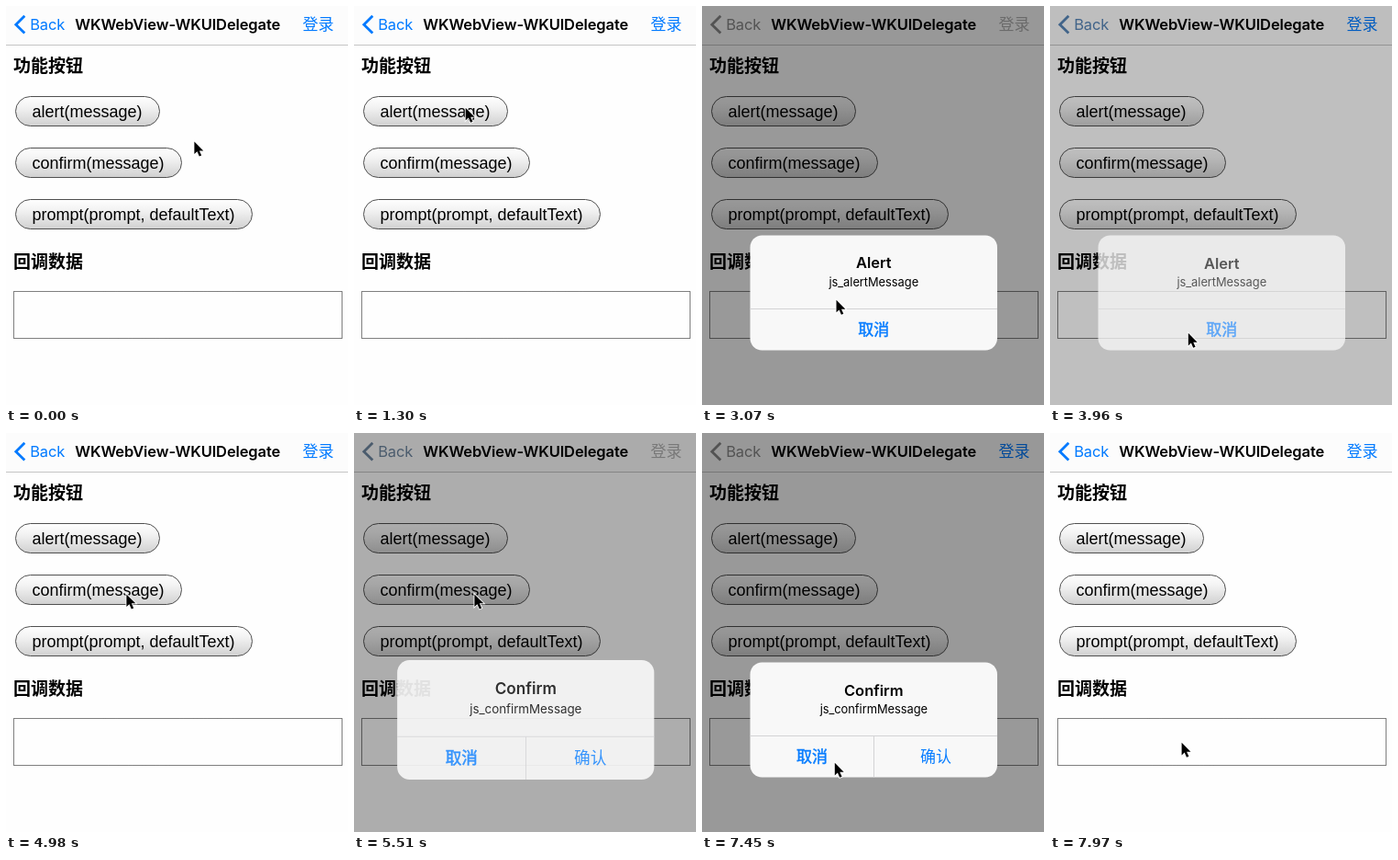
These frames come from a looping animation (373x434 px, 8 s). An HTML page:

```html
<!DOCTYPE html>
<html lang="zh-CN">
<head>
<meta charset="utf-8">
<title>WKWebView-WKUIDelegate</title>
<style>
  html, body { margin: 0; width: 100%; height: 100%; overflow: hidden; background: #fefefe; }
  svg { display: block; width: 100vw; height: 100vh; }
  text { font-family: Inter, "Noto Sans CJK SC", "Noto Sans CJK", sans-serif; white-space: pre; }
  .title { font-size: 16.5px; font-weight: 600; text-anchor: middle; }
  .nav { font-size: 16.5px; letter-spacing: -.15px; }
  .cjk { font-family: "Noto Sans CJK SC", "Noto Sans CJK", sans-serif; font-size: 17px; }
  .head { font-size: 19px; font-weight: 700; }
  .btn rect { fill: url(#gloss); stroke: #505050; }
  .btn text { font: 18px "Liberation Sans", Arial, sans-serif; }
  .msg { font-size: 12.9px; letter-spacing: -.05px; text-anchor: middle; }
  .act { fill: #087dff; text-anchor: middle; }
  .cancel { stroke: #087dff; stroke-width: .5; }
  .rule { stroke: #d3d3d5; stroke-width: 1; }
</style>
</head>
<body>
<svg viewBox="0 0 373 434">
  <defs>
    <linearGradient id="gloss" x2="0" y2="1">
      <stop offset="0" stop-color="#fefefe"/>
      <stop offset=".35" stop-color="#f3f3f3"/>
      <stop offset=".6" stop-color="#e6e6e6"/>
      <stop offset="1" stop-color="#d0d0d0"/>
    </linearGradient>
  </defs>

  <rect width="373" height="434" fill="#fefefe"/>
  <rect width="373" height="42" fill="#fcfcfc"/>
  <path d="M0 42.5H373" stroke="#c4c4c4"/>
  <g id="back">
    <path d="M20.3 10.8L10.8 20.2L20.3 29.6" fill="none" stroke="currentColor" stroke-width="2.8"/>
    <text class="nav" x="26.2" y="26" fill="currentColor">Back</text>
  </g>
  <text class="title" x="187.2" y="26" letter-spacing="-.12">WKWebView-WKUIDelegate</text>
  <text class="cjk" id="login" x="323.6" y="26">登录</text>

  <text class="cjk head" x="8" y="71.5">功能按钮</text>
  <g class="btn"><rect x="10.5" y="98.5" width="157" height="32" rx="16"/><text x="28.5" y="121">alert(message)</text></g>
  <g class="btn"><rect x="10.5" y="154.5" width="181" height="32" rx="16"/><text x="28.5" y="177">confirm(message)</text></g>
  <g class="btn"><rect x="10.5" y="210.5" width="258" height="32" rx="16"/><text x="28.5" y="233">prompt(prompt, defaultText)</text></g>
  <text class="cjk head" x="8" y="285.2">回调数据</text>
  <rect x="8.5" y="310.5" width="358" height="51" fill="none" stroke="#000" stroke-dasharray="1 1"/>

  <rect id="dim" width="373" height="434" opacity="0"/>

  <g id="dialog">
    <rect id="panel" x="52.5" y="249.5" width="269.5" height="125" rx="13" fill="#f8f8f8"/>
    <g id="content">
      <path class="rule" d="M52.5 329.5H322"/>
      <g id="alert">
        <text class="title" x="187.3" y="285.5">Alert</text>
        <text class="msg" x="187.3" y="305">js_alertMessage</text>
        <text class="cjk act cancel" x="187.3" y="358">取消</text>
      </g>
      <g id="confirm">
        <path class="rule" d="M187.5 329.5V374.5"/>
        <text class="title" x="187.3" y="285.5">Confirm</text>
        <text class="msg" x="187.3" y="305">js_confirmMessage</text>
        <text class="cjk act cancel" x="120" y="358">取消</text>
        <text class="cjk act" x="255" y="358">确认</text>
      </g>
    </g>
  </g>

  <path id="cursor" d="M0 0V13.6L3.1 10.8L5.4 16L7.8 15L5.5 9.9H9.9Z" stroke="#fff" stroke-width="1.8" paint-order="stroke"/>
</svg>

<script>
const LOOP = 8000;
const $ = id => document.getElementById(id);
const BLUE = [0, 122, 255], GREY = [138, 138, 138];

// open: dialog appears, tap: button released, close: fade begins
const dialogs = [
  { id: 'alert', open: 1640, tap: 3790, close: 3855, end: 4570, k: 12.4 },
  { id: 'confirm', open: 5250, tap: 7340, close: 7450, end: 7740, k: 17 }
];

// pointer moves: start, end, target x, target y
const moves = [
  [330, 1120, 127.6, 112.6],
  [1150, 1300, 121.7, 110.8],
  [2510, 3250, 150.8, 355.8],
  [4050, 4980, 131.4, 175.4],
  [6200, 6810, 144.8, 358.8],
  [7880, 7970, 143.6, 336.8]
];

const clamp = v => Math.min(1, Math.max(0, v));
const smooth = u => u * u * (3 - 2 * u);

// remaining distance of a critically damped spring
function decay(ms, k) {
  const x = Math.max(0, ms) * k / 1000;
  return (1 + x) * Math.exp(-x);
}

function pointer(t) {
  let x = 205.4, y = 147.5;
  for (const [start, end, tx, ty] of moves) {
    const u = smooth(clamp((t - start) / (end - start)));
    x += (tx - x) * u;
    y += (ty - y) * u;
  }
  return [x, y];
}

function draw(t) {
  const d = dialogs.find(d => t >= d.open && t < d.end);
  let shown = 0, scale = 1;
  if (d) {
    const left = decay(t - d.open, 11.5);
    shown = t < d.close ? 1 - left : decay(t - d.close, d.k);
    if (t < d.close) scale = 1 + 0.2 * left;
    for (const e of dialogs) $(e.id).style.display = e === d ? '' : 'none';
  }
  $('dialog').style.display = d ? '' : 'none';
  $('dialog').setAttribute('transform',
    `translate(187.25 312) scale(${scale}) translate(-187.25 -312)`);
  $('panel').setAttribute('opacity', 1 - Math.pow(1 - shown, 1.5));
  $('content').setAttribute('opacity', shown);
  $('dim').setAttribute('opacity', 0.4 * shown);

  const tint = BLUE.map((c, i) => Math.round(c + (GREY[i] - c) * shown));
  $('back').style.color = `rgb(${tint})`;
  $('login').setAttribute('fill', d && t < d.tap ? '#b0b0b0' : `rgb(${BLUE})`);
  $('cursor').setAttribute('transform', `translate(${pointer(t)})`);
}

const begin = performance.now();
function tick() {
  draw((performance.now() - begin) % LOOP);
  requestAnimationFrame(tick);
}
tick();
</script>
</body>
</html>
```
